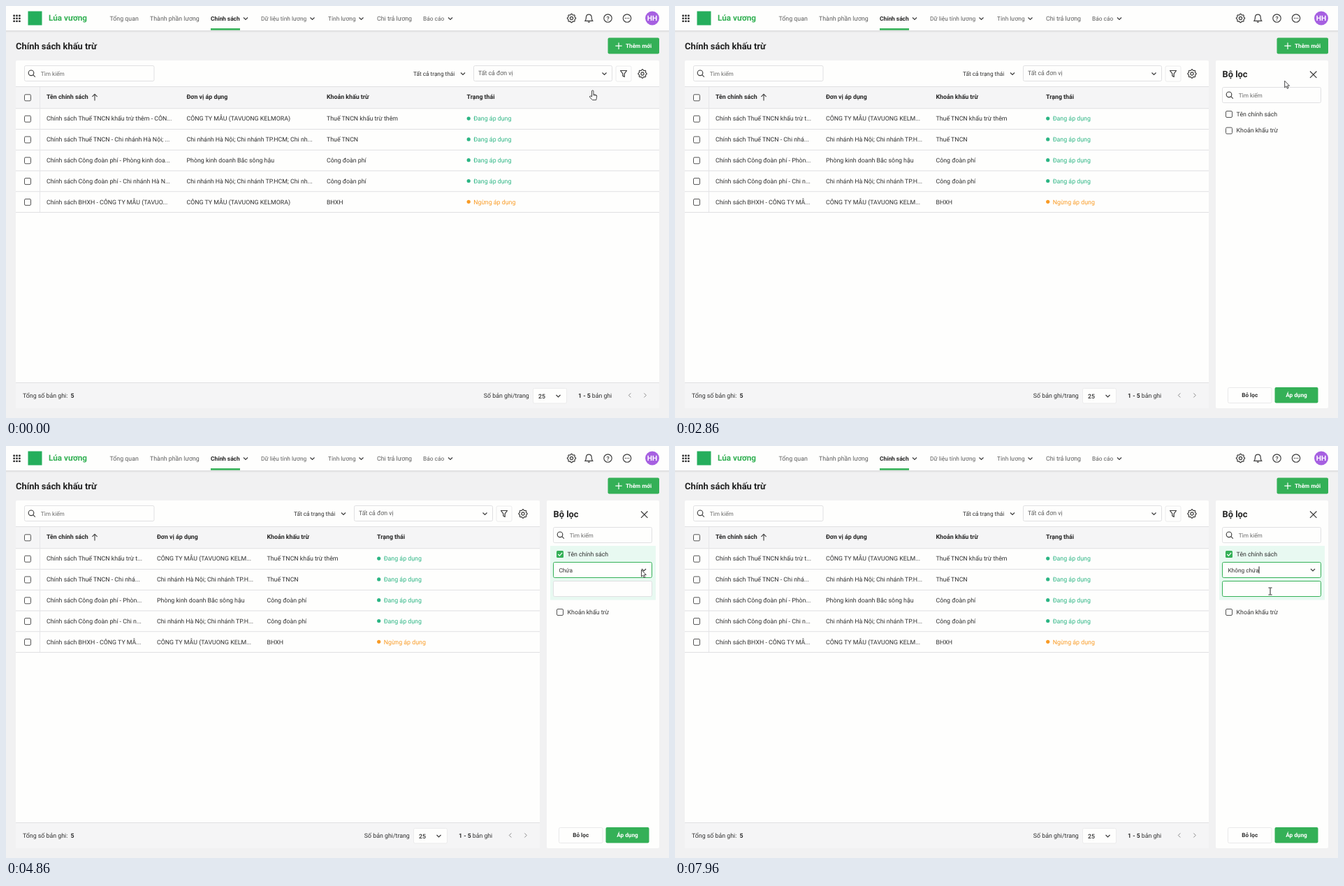
Recreate the animation shown at these times as an HTML page. Size 949 px wide and 590 px high, loop 8 s.

```html
<!DOCTYPE html>
<html lang="vi">
<head>
<meta charset="utf-8">
<title>Bộ lọc</title>
<style>
html, body { margin: 0; width: 100%; height: 100%; overflow: hidden; background: #f1f1f2; }
svg { display: block; width: 949px; height: 590px; }
text { font-family: Roboto, "Open Sans", sans-serif; text-rendering: geometricPrecision; white-space: pre; }
.menu { filter: drop-shadow(0 1px 4px rgba(0, 0, 0, .16)); }
</style>
</head>
<body>
<svg id="stage" viewBox="0 0 949 590"></svg>
<script>
const LOOP = 8000;
const GREEN = '#34b057', MINT = '#e8f9f1', WHITE = '#fefefd', INK = '#303030', GREY = '#5c5c5c', LINE = '#e0e0e2', ICON = '#3c3c3c';

const rect = (x, y, w, h, fill, more = '') => `<rect x="${x}" y="${y}" width="${w}" height="${h}" fill="${fill}" ${more}/>`;
const box = (x, y, w, h, stroke = LINE, more = '') => rect(x, y, w, h, WHITE, `rx="2" stroke="${stroke}" ${more}`);
const path = (d, stroke = ICON, width = 1.1, more = '') =>
  `<path d="${d}" fill="none" stroke="${stroke}" stroke-width="${width}" ${more}/>`;
const circle = (x, y, r, fill, more = '') => `<circle cx="${x}" cy="${y}" r="${r}" fill="${fill}" ${more}/>`;
const ring = (x, y, r) => circle(x, y, r, 'none', `stroke="${ICON}" stroke-width="1.15"`);
const text = (x, y, s, size = 8.8, fill = INK, weight = 400, more = '') =>
  `<text x="${x}" y="${y}" font-size="${size}" fill="${fill}" font-weight="${weight}" ${more}>${s}</text>`;
const group = (id, body, more = '') => `<g id="${id}" ${more}>${body}</g>`;

const chevron = (x, y) => path(`M${x - 3} ${y - 1.5}l3 3l3-3`, ICON, 1.2);
const checkbox = (x, y) => rect(x - 4.5, y - 4.5, 9, 9, WHITE, 'rx="1.5" stroke="#555" stroke-width="1"');
const lens = (x, y) => ring(x - 1, y - 1, 3.8) + path(`M${x + 1.8} ${y + 1.8}l3 3`);
const search = (id, x, y, w) =>
  box(x, y, w, 22, LINE, `id="${id}"`) + lens(x + 10.5, y + 11.3) + text(x + 23.3, y + 14.4, 'Tìm kiếm', 8.25, '#6a6a6a');

function gear(x, y) {
  const pts = [];
  for (let i = 0; i < 32; i++) {
    const r = i % 4 < 2 ? 6.1 : 5, a = (i - .5) * Math.PI / 16;
    pts.push(`${(x + r * Math.cos(a)).toFixed(2)} ${(y + r * Math.sin(a)).toFixed(2)}`);
  }
  return path(`M${pts.join('L')}Z`, ICON, 1.2, 'stroke-linejoin="round"') + ring(x, y, 2.1);
}

function topBar() {
  let s = rect(0, 36, 949, 1.5, '#e6e6e7') + rect(0, 0, 949, 35.5, WHITE) + rect(0, 35, 949, 1, '#dcdcdd');
  for (let i = 0; i < 9; i++) s += rect(10.3 + i % 3 * 3.9, 12.6 + Math.floor(i / 3) * 3.9, 2.6, 2.6, '#333', 'rx=".6"');
  s += rect(31.5, 7.5, 20, 20, '#25ae5c') + text(61, 21.2, 'Lúa vương', 11.7, '#32b053', 700);
  const nav = [[148.5, 'Tổng quan'], [206, 'Thành phần lương'], [293, 'Chính sách', 343], [365, 'Dữ liệu tính lương', 438.5],
    [461, 'Tính lương', 508.5], [531, 'Chi trả lương'], [597, 'Báo cáo', 636]];
  nav.forEach(([x, label, arrow], i) => {
    s += i === 2 ? text(x, 21, label, 8.35, '#222', 700) : text(x, 21, label, arrow ? 8.35 : 8.8, GREY);
    if (arrow) s += chevron(arrow, 18);
  });
  s += rect(293, 32, 42, 2.6, GREEN) + gear(809.5, 17.5);
  s += path('M829 21.3Q830.4 19.8 830.4 16.3Q830.4 12.2 834.3 12.2T838.2 16.3Q838.2 19.8 839.6 21.3ZM832.8 23.2h3', ICON, 1.2);
  s += ring(861.5, 17.5, 5.7) + text(861.5, 20.6, '?', 8.5, ICON, 500, 'text-anchor="middle"') + ring(889, 17.5, 5.7);
  for (const dx of [-2.5, 0, 2.5]) s += circle(889 + dx, 17.5, .75, ICON);
  s += circle(925, 17.5, 10, '#a660e1') + text(925, 21.1, 'HH', 10.2, '#fff', 700, 'text-anchor="middle"');
  s += text(14, 61.7, 'Chính sách khấu trừ', 12.9, '#222', 700);
  s += rect(861.5, 45.5, 73.5, 23, GREEN, 'rx="2"') + path('M872.3 57.2h9.4M877 52.5v9.4', '#fff', 1.2);
  return s + text(887, 60.3, 'Thêm mới', 8.2, '#fff', 700);
}

const DUES = 'Công đoàn phí', BRANCH = 'Chi nhánh Hà Nội; Chi nhánh TP.H', FIRM = 'CÔNG TY MẪU (TAVUONG KELM';
const item = ['Thuế TNCN khấu trừ thêm', 'Thuế TNCN', DUES, DUES, 'BHXH'];
const WIDE = {
  right: 935, cols: [58, 258.5, 459, 659.5],
  name: ['Thuế TNCN khấu trừ thêm - CÔN...', 'Thuế TNCN - Chi nhánh Hà Nội; ...', 'Công đoàn phí - Phòng kinh doa...',
    'Công đoàn phí - Chi nhánh Hà N...', 'BHXH - CÔNG TY MẪU (TAVUO...'],
  firm: FIRM + 'ORA)', branch: BRANCH + 'CM; Chi nh...'
};
const NARROW = {
  right: 764, cols: [58, 216, 373.5, 531],
  name: ['Thuế TNCN khấu trừ t...', 'Thuế TNCN - Chi nhá...', 'Công đoàn phí - Phòn...',
    'Công đoàn phí - Chi n...', 'BHXH - CÔNG TY MẪ...'],
  firm: FIRM + '...', branch: BRANCH + '...'
};

function table(view, key) {
  const { right, cols, name, firm, branch } = view, w = right - 14, d = right - 935;
  const unit = [firm, branch, 'Phòng kinh doanh Bắc sông hậu', branch, firm];
  let s = rect(14, 78, w, 498, WHITE, 'rx="2"') + search(key + 'Search', 26.5, 85.5, 185.5);
  s += text(583 + d, 100, 'Tất cả trạng thái', 8.25) + chevron(654 + d, 97);
  s += box(669.5 + d, 85.5, 198, 22) + text(676 + d, 99.4, 'Tất cả đơn vị', 8.75, GREY) + chevron(856.5 + d, 97);
  s += box(873 + d, 86, 22, 22, '#ececed', `id="${key}Button"`);
  s += path(`M${879.5 + d} 92.5h9l-3.3 4.4v4.6l-2.4-1.5v-3.1Z`, ICON, 1.2, 'stroke-linejoin="round"') + gear(911 + d, 97);
  s += rect(14, 115.5, w, 31, '#f5f5f6');
  for (let i = 0; i < 7; i++) s += rect(14, i ? 116.5 + i * 29.75 : 115, w, 1, LINE);
  s += rect(48, 116, 1, 179, '#e6e6e8') + checkbox(31, 131.3);
  ['Tên chính sách', 'Đơn vị áp dụng', 'Khoản khấu trừ', 'Trạng thái'].forEach((h, i) => s += text(cols[i], 133.4, h, 8.8, '#262626', 700));
  s += path('M127 135.6v-9.2M123.4 129.8l3.6-3.6l3.6 3.6');
  for (let i = 0; i < 5; i++) {
    const y = 164.3 + i * 29.8, on = i < 4, color = on ? '#2bb583' : '#f99b25';
    s += checkbox(31, y - 2.6) + text(cols[0], y, 'Chính sách ' + name[i]) + text(cols[1], y, unit[i]) + text(cols[2], y, item[i]);
    s += circle(cols[3] + 2.7, y - 3.2, 2.6, color) + text(cols[3] + 9.7, y, on ? 'Đang áp dụng' : 'Ngừng áp dụng', 8.8, color);
  }
  s += rect(14, 539.5, w, 36.5, '#f5f5f6') + rect(14, 539, w, 1, LINE);
  s += text(24, 561, 'Tổng số bản ghi:') + text(92.6, 561, '5', 8.8, INK, 700);
  s += text(683.8 + d, 561.4, 'Số bản ghi/trang') + box(754.5 + d, 547.5, 48, 21.5, '#ebebec');
  s += text(762 + d, 561.6, '25', 8.8, INK, 500) + chevron(790.5 + d, 558.5);
  s += text(819 + d, 561, '<tspan font-weight="700">1 - 5</tspan> bản ghi', 8.7);
  s += path(`M${894.3 + d} 554.5l-3 3l3 3M${913.3 + d} 554.5l3 3l-3 3`, '#8c8c8c', 1);
  return s;
}

function panel() {
  let s = rect(774, 78, 161, 498, WHITE, 'rx="2"') + text(783.6, 102.2, 'Bộ lọc', 12.8, '#222', 700);
  s += path('M909 93.5l9.4 9.4M918.4 93.5l-9.4 9.4', ICON, 1.2) + search('find', 783.5, 116.5, 141);
  const field = rect(779, 143, 151, 77.5, MINT) + rect(788, 150, 10, 10, GREEN, 'rx="1.5"') + path('M790.2 155l2.2 2.2l3.8-4.3', '#fff', 1.2) +
    box(783.5, 166.5, 141, 22, LINE, 'id="select"') + text(791.4, 180.6, 'Chứa', 8.3, INK, 400, 'id="choice"') + chevron(913, 177.5) +
    path('M836 172.5v10', '#222', 1, 'id="caret"') + box(783.5, 193.5, 141, 22, LINE, 'id="input"');
  s += rect(785.5, 147.5, 15, 15, '#ebebec', 'id="halo" rx="3"') + group('unchecked', checkbox(793, 155)) + group('checked', field);
  s += text(803.6, 157.8, 'Tên chính sách', 8.75);
  s += group('second', checkbox(793, 178.5) + text(803.6, 181.3, 'Khoản khấu trừ', 8.75));
  s += box(791.5, 546.5, 62.5, 22, '#e9e9ea') + text(822.7, 560.4, 'Bỏ lọc', 8.2, INK, 700, 'text-anchor="middle"');
  return s + rect(858.5, 546, 62, 22.5, GREEN, 'rx="2"') + text(889.5, 560.4, 'Áp dụng', 8.25, '#fff', 700, 'text-anchor="middle"');
}

function menu() {
  let s = rect(783.5, 190, 141, 102.5, WHITE, 'class="menu" rx="1.5"') + rect(784, 192, 135, 21, MINT);
  s += rect(784, 213, 135, 19.5, MINT, 'id="hover"') + rect(919, 190, 5.5, 102.5, '#f1f1f1') + rect(919.3, 191.5, 4.9, 71, '#9b9b9b', 'rx="1"');
  ['Chứa', 'Không chứa', 'Bằng', 'Bắt đầu bằng', 'Kết thúc bằng'].forEach((label, i) =>
    s += text(790.4, 205.2 + i * 19.85, label, 8.3, i ? INK : GREEN));
  return s;
}

const outline = 'fill="#fff" stroke="#333" stroke-width=".9" stroke-linejoin="round"';
const cursors =
  group('arrow', `<path d="M0 0V9.6L2.2 7.6L3.7 11L5.3 10.3L3.8 7H6.8Z" ${outline}/>`) +
  group('hand', `<path d="M-1.5 8V1a1.2 1.2 0 0 1 2.4 0V5.5L4.4 6.3Q5.9 6.7 5.7 8.3L4.7 13.6H-.6L-4.7 9.2Q-4.4 7.4-2.7 8L-1.5 9Z" ${outline}/>` +
    path('M.9 5.5v2M2.7 6v1.8M4.3 6.5v1.6', '#333', .8)) +
  group('beam', path('M-2.5-5H-.6L0-4.5L.6-5H2.5M-2.5 5H-.6L0 4.5L.6 5H2.5M0-4.5V4.5', '#222', 1));

document.getElementById('stage').innerHTML =
  rect(0, 0, 949, 590, '#f1f1f2') + topBar() + group('wide', table(WIDE, 'wide')) +
  group('mark', rect(866.5, 80.5, 35, 33, 'none', 'stroke="#fb0d1b" stroke-width="2.8"')) +
  group('narrow', table(NARROW, 'narrow') + panel() + group('menu', menu())) + group('cursor', cursors);

const el = {};
document.querySelectorAll('[id]').forEach(e => el[e.id] = e);

// time, x, y, ease out into this point
const KEYS = [[0, 840, 121], [400, 850, 126], [830, 867, 129], [1160, 869, 122], [1630, 884, 95], [2029, 884, 95],
  [2030, 877, 101], [2830, 877, 101], [2860, 873, 107], [3430, 796, 156, 1], [4400, 796, 156], [4860, 909.5, 177.5, 1],
  [5700, 909.5, 177.5], [6030, 907, 193], [6300, 846, 219, 1], [7400, 846, 219], [7960, 852, 208, 1], [8000, 852, 208]];

function pointer(t) {
  const i = KEYS.findIndex(k => k[0] > t), a = KEYS[i - 1], b = KEYS[i];
  let u = (t - a[0]) / (b[0] - a[0]);
  if (b[3]) u = 1 - (1 - u) ** 2;
  return [a[1] + (b[1] - a[1]) * u, a[2] + (b[2] - a[2]) * u];
}

const show = (name, on) => el[name].style.display = on ? '' : 'none';
const within = (t, a, b) => t >= a && t < b;
const ramp = (t, a, b) => Math.min(1, Math.max(0, (t - a) / (b - a)));
const border = (name, on) => el[name].setAttribute('stroke', on ? GREEN : LINE);

function render(t) {
  const [x, y] = pointer(t);
  const open = t >= 2030, checked = t >= 4130, picked = t >= 6660;
  const finding = within(t, 2860, 3430) && within(y, 116.5, 138.5);
  const typing = t >= 7430 && y < 215.5;

  show('wide', !open);
  show('narrow', open);
  show('mark', !open);
  el.mark.style.opacity = ramp(t, 300, 700);
  el.wideButton.setAttribute('fill', within(t, 1450, 2030) ? '#f4f4f5' : WHITE);

  border('find', finding);
  show('halo', !checked && within(y, 148, 170) && x < 803);
  show('unchecked', !checked);
  show('checked', checked);
  el.second.setAttribute('transform', `translate(0 ${checked ? 59.5 : 0})`);
  border('select', t >= 4470);
  border('input', typing);
  el.choice.textContent = picked ? 'Không chứa' : 'Chứa';
  show('caret', within(t, 6730, 7230) || t >= 7730);

  show('menu', within(t, 5230, 6760));
  el.menu.style.opacity = picked ? .5 : 1;
  show('hover', y > 212.5);

  const hand = t < 450 || within(t, 1500, 2030) || within(t, 3330, 4460) || within(t, 6080, 6760);
  const kind = finding || typing ? 'beam' : hand ? 'hand' : 'arrow';
  for (const k of ['arrow', 'hand', 'beam']) show(k, k === kind);
  el.cursor.setAttribute('transform', `translate(${x.toFixed(1)} ${y.toFixed(1)})`);
}

const start = performance.now();
function tick() {
  render((performance.now() - start) % LOOP);
  requestAnimationFrame(tick);
}
tick();
</script>
</body>
</html>
```
